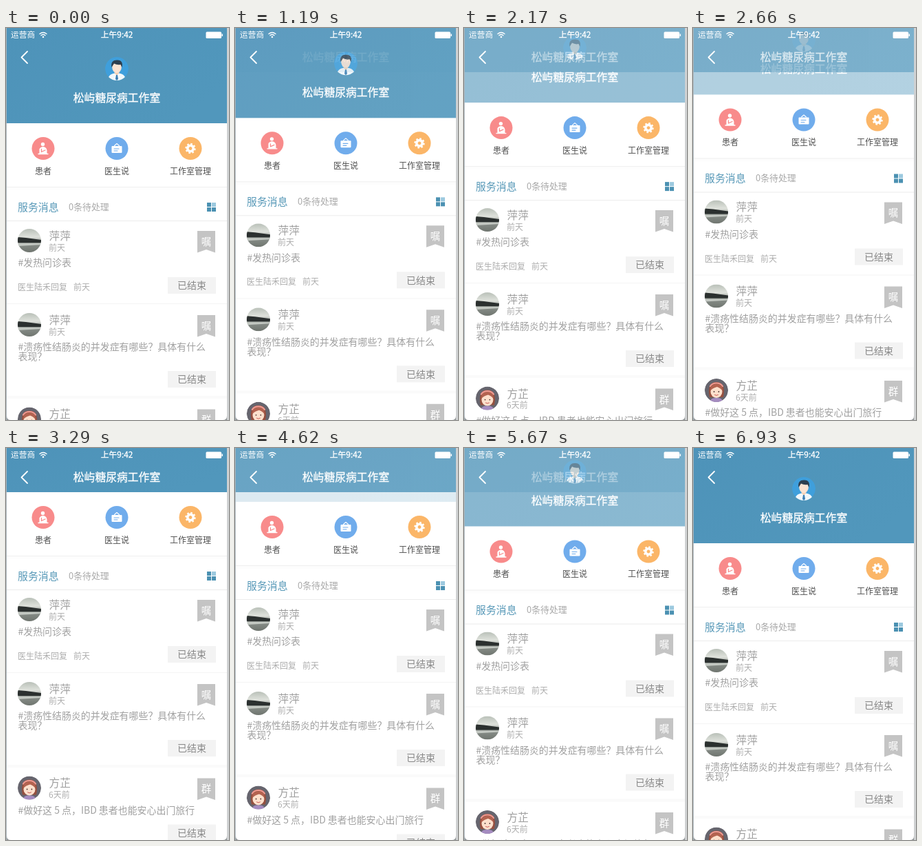
Recreate the animation shown at these times as an HTML page. Size 324 px wide and 568 px high, loop 7000 ms.

```html
<!DOCTYPE html>
<html lang="zh-CN">
<head>
<meta charset="utf-8">
<style>
html, body { margin: 0; width: 100%; height: 100%; overflow: hidden; background: #fff; }
svg { display: block; width: 324px; height: 568px; }
text { font-family: 'Noto Sans CJK SC', 'Noto Sans CJK', 'Noto Sans', sans-serif; font-weight: 300; }
</style>
</head>
<body>
<svg id="stage" viewBox="0 0 324 568" xmlns="http://www.w3.org/2000/svg"></svg>
<script>
const LOOP = 7000, STEP = 70, TRAVEL = 74;
const studio = '松屿糖尿病工作室';

// Text placed by its vertical centre
function label(x, y, size, fill, str, extra = '') {
  return `<text x="${x}" y="${y + size * 0.375}" font-size="${size}" fill="${fill}" ${extra}>${str}</text>`;
}
const mid = 'text-anchor="middle"';
const bold = mid + ' stroke="#fff" stroke-width="0.3" style="font-weight:500"';
const rect = (x, y, w, h, fill) => `<rect x="${x}" y="${y}" width="${w}" height="${h}" fill="${fill}"/>`;
const disc = (x, y, r, fill) => `<circle cx="${x}" cy="${y}" r="${r}" fill="${fill}"/>`;
const path = (d, fill) => `<path d="${d}" fill="${fill}"/>`;
const line = (d, width, stroke = '#fff') =>
  `<path d="${d}" fill="none" stroke="${stroke}" stroke-width="${width}" stroke-linecap="round" stroke-linejoin="round"/>`;
const at = (x, y, body) => `<g transform="translate(${x} ${y})">${body}</g>`;
const round = (x, y, body) => at(x, y, `<g clip-path="url(#round)">${body}</g>`);

const doctor = round(161, 59,
  disc(0, 0, 17, '#3f9fdc') +
  path('M-13 18C-13 9 -8 7 0 6C8 7 13 9 13 18Z', '#f2f8fb') +
  path('M-4 5L0 10L4 5Z', '#f4cfb2') +
  path('M-1 9H1L2 15L0 17L-2 15Z', '#3c7fb4') +
  `<ellipse cy="-2" rx="6.8" ry="8.2" fill="#fbe3d2"/>` +
  path('M-7.5 -2C-9 -10 -5 -13 1 -12.5C7 -12.5 9 -8 7.5 -2L5.5 -6Q0 -5 -4 -7.5Z', '#2d3f50'));

const scenery = round(0, 0,
  rect(-17, -17, 34, 34, 'url(#photo)') +
  path('M-17 -5L-5 -4L17 -1V3L-17 3Z', '#2b302f') +
  path('M-17 4L17 4V6L-17 8Z', '#c3c8c2'));

const girl = round(0, 0,
  disc(0, 0, 17, '#66656e') +
  path('M-10 10C-13 -5 -9 -12 0 -12C9 -12 13 -5 10 10Z', '#96503f') +
  path('M-10 18C-9 12 -5 11 0 11C5 11 9 12 10 18Z', '#a58cc0') +
  `<ellipse cy="2" rx="8.5" ry="9" fill="#fde0cc"/>` +
  path('M-9 1C-9 -7 -4 -9 0 -9C5 -9 9 -7 9 1C7 -2 4 -4 1 -5C-3 -4 -7 -2 -9 1Z', '#b46350') +
  line('M-9 -6C-5 -12 5 -12 9 -6', 2.2, '#ee9a92') +
  disc(-3.4, 2, 0.9, '#4c3431') + disc(3.4, 2, 0.9, '#4c3431') +
  line('M-2.5 6.5Q0 8.5 2.5 6.5', 1, '#cc5b53'));

const patientIcon = disc(0, 0, 16.5, '#f88b8b') + disc(-0.5, -6, 2.7, '#fff') +
  path('M-5.5 8V1Q-4 -2.5 0 -2.5Q5 -2 5.5 3V8Z', '#fff') +
  line('M-2.5 1V5L3 2.5', 1.3, '#f88b8b') + line('M-7 8H7', 1.3);
const boardIcon = disc(0, 0, 16.5, '#70acec') +
  `<rect x="-7.5" y="-3.5" width="15" height="10" rx="1" fill="#fff"/>` +
  line('M-3.5 -4L0 -7L3.5 -4', 1.1) + line('M-4 0.5H3M-4 3.5H1', 1.1, '#70acec');
const gearIcon = disc(0, 0, 16.5, '#fbb668') +
  `<circle r="4.2" fill="none" stroke="#fff" stroke-width="3.6"/>` +
  `<circle r="6.6" fill="none" stroke="#fff" stroke-width="2.2" stroke-dasharray="2.592"/>`;

function menuItem(x, icon, name) {
  return at(x, 174.5, icon) + label(x, 207, 12, '#505050', name, mid);
}

function card(y, who, when, tag, face, lines, buttonY, note = '') {
  return at(0, y,
    at(34, 0, face) +
    label(62.5, -7, 15.7, '#a0a0a0', who) +
    label(62, 10, 12, '#adadad', when) +
    path('M278 -14H304V17.5L291 13L278 17.5Z', '#c4c4c4') +
    label(291, 1.5, 14.5, '#fff', tag, mid) +
    lines.map((s, i) => label(17.5, 32 + i * 14, 13.95, '#a0a0a0', s)).join('') +
    note +
    rect(235, buttonY, 70, 24, '#f3f3f3') +
    label(270, buttonY + 12, 14, '#8a8a8a', '已结束', mid));
}

const menu =
  menuItem(54, patientIcon, '患者') +
  menuItem(161, boardIcon, '医生说') +
  menuItem(268, gearIcon, '工作室管理') +
  rect(1, 230, 320, 5, '#fdfdfd') + rect(1, 230, 320, 1, '#efefef');

const section =
  label(17, 259, 14.9, '#5899b8', '服务消息') +
  label(91, 259, 12.9, '#a8a8a8', '0条待处理') +
  rect(292, 253, 6, 6, '#4b91b2') + rect(299, 253, 6, 6, '#9cc9df') +
  rect(292, 260, 6, 6, '#4b91b2') + rect(299, 260, 6, 6, '#4b91b2') +
  rect(1, 279, 320, 1, '#ececec');

const list =
  card(308, '萍萍', '前天', '嘱', scenery, ['#发热问诊表'], 53,
    label(17, 67.5, 12, '#adadad', '医生陆禾回复') + label(98, 67.5, 12, '#adadad', '前天')) +
  rect(1, 399, 320, 1, '#f4f4f4') +
  card(430, '萍萍', '前天', '嘱', scenery,
    ['#溃疡性结肠炎的并发症有哪些？具体有什么', '表现？'], 67) +
  rect(1, 533, 320, 4, '#fafafa') +
  card(566.5, '方芷', '6天前', '群', girl,
    ['#做好这 5 点，IBD 患者也能安心出门旅行'], 53);

const statusBar =
  label(7, 10, 11.7, '#fff', '运营商') +
  line('M49 8.5Q54 4.5 59 8.5M51 10.8Q54 8.3 57 10.8', 1.4) + disc(54, 13, 1.3, '#fff') +
  label(161, 10, 11.8, '#fff', '上午9:42', bold) +
  `<rect x="290.5" y="5.5" width="22.5" height="9.5" rx="1.5" fill="#fff"/>` + rect(313.5, 8.5, 1.5, 3.5, '#fff');

document.getElementById('stage').innerHTML = `
<defs>
  <linearGradient id="blue" x1="0" y1="0" x2="1" y2="0.6">
    <stop offset="0" stop-color="#4e93b9"/><stop offset="1" stop-color="#5197bc"/>
  </linearGradient>
  <linearGradient id="photo" x1="0" y1="0" x2="0" y2="1">
    <stop offset="0" stop-color="#b9c0b8"/><stop offset="0.35" stop-color="#dfe2dc"/>
    <stop offset="0.6" stop-color="#8b918c"/><stop offset="1" stop-color="#6f756f"/>
  </linearGradient>
  <clipPath id="round"><circle r="17"/></clipPath>
</defs>
${rect(0, 0, 324, 568, '#fff')}
<g id="page">
  <g id="head">
    ${rect(1, 0, 320, 138, 'url(#blue)')}
    ${doctor}
    ${label(161, 101, 15.8, '#fff', studio, bold)}
  </g>
  ${menu}${section}${list}
</g>
<g id="nav">
  ${rect(1, 0, 320, 64, 'url(#blue)')}
  ${label(161, 42, 15.8, '#fff', studio, bold)}
</g>
${statusBar}
${line('M31 34L22.5 42.5L31 51', 1.8)}
${rect(0, 0, 1, 568, '#a9b4b9')}
${rect(321, 0, 3, 568, '#cfd1d2')}
${path('M1 562Q1 568 7 568H1ZM321 562Q321 568 315 568H321Z', '#8f9496')}`;

const [page, head, nav] = ['page', 'head', 'nav'].map(id => document.getElementById(id));

// Drag up, hold collapsed, drag back: [time, scroll]
const keys = [[0, 0], [700, 0], [1680, 20.5], [2660, 41.5], [3290, 74],
  [3950, 74], [4620, 60], [5670, 24.5], [6600, 0], [7000, 0]];
const slope = i => (keys[i + 1][1] - keys[i][1]) / (keys[i + 1][0] - keys[i][0]);
const tangents = keys.map((k, i) => {
  if (!i || i === keys.length - 1) return 0;
  const a = slope(i - 1), b = slope(i);
  return a * b > 0 ? 2 * a * b / (a + b) : 0;
});

function scrollAt(t) {
  let i = 0;
  while (i < keys.length - 2 && t >= keys[i + 1][0]) i++;
  const [t0, s0] = keys[i], [t1, s1] = keys[i + 1];
  const d = t1 - t0, u = (t - t0) / d, v = 1 - u;
  return s0 * v * v * (1 + 2 * u) + s1 * u * u * (3 - 2 * u) +
    d * u * v * (tangents[i] * v - tangents[i + 1] * u);
}

function draw() {
  const t = Math.floor(performance.now() % LOOP / STEP) * STEP;
  const s = scrollAt(t), k = s / TRAVEL;
  page.setAttribute('transform', `translate(0 ${-s.toFixed(2)})`);
  head.setAttribute('opacity', 1 - k);
  nav.setAttribute('opacity', k);
  requestAnimationFrame(draw);
}
draw();
</script>
</body>
</html>
```
